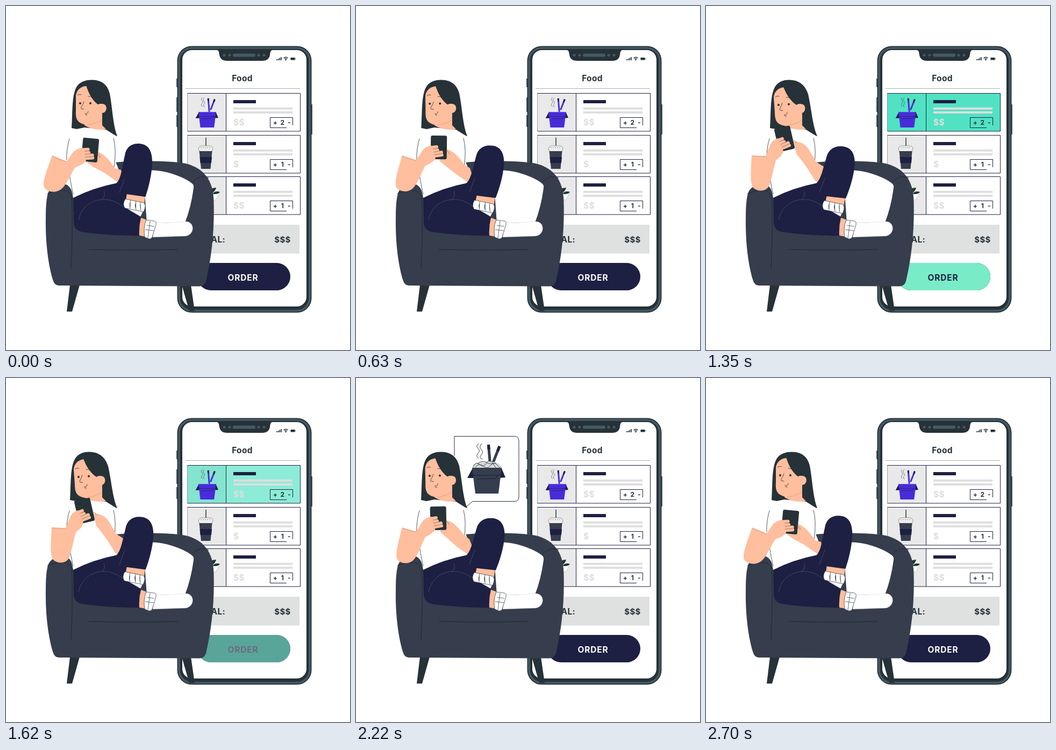
An HTML page for the animation above (2760 ms loop, 640x640 px).

```html
<!DOCTYPE html>
<html lang="en">
<head>
<meta charset="utf-8">
<title>Ordering food from the couch</title>
<style>
  html, body { margin: 0; width: 100%; height: 100%; overflow: hidden; background: #fff; }
  svg { display: block; width: 100vw; height: 100vh; }
  text { font: 700 15.5px Inter, "Open Sans", sans-serif; fill: #263238; letter-spacing: .3px; }
  .line { fill: none; stroke: #1d2040; stroke-width: 1; }
  .thin { fill: none; stroke: #263238; stroke-width: .8; stroke-linecap: round; }
  .skin { fill: #ffbe9d; }
  .navy { fill: #1d2042; }
  .sofa { fill: #363d4c; }
  .dark { fill: #263238; }
  .steel { fill: #455a64; }
  .white { fill: #fff; }
</style>
</head>
<body>
<svg viewBox="0 0 640 640">
  <defs>
    <g id="takeout">
      <path d="M218 166L207 186H220M270 166L278 185L266 186" fill="#1d2042"/>
      <path d="M216 167H271L265 215H222Z"/>
      <g fill="none" stroke-linecap="round">
        <path d="M228 122q-6 5-1 9t0 9t1 10M234 122q-6 6-1 11t0 10t2 8" stroke="#37404a"/>
        <path d="M217 181H269M226 188L260 187L265 178" stroke="#1a1d35" stroke-opacity=".65" stroke-width="1.5"/>
      </g>
    </g>
    <g id="sticks" fill="none" stroke-width="5">
      <path d="M246.500 124L250 166M267 127L254 160" stroke="currentColor"/>
      <path d="M246.500 124L247.200 133M267 127L263.500 136" stroke="#1d2042"/>
    </g>
  </defs>

  <g id="handset">
    <path class="steel" d="M317 135h4v16h-4zM317 170h4v27h-4zM317 203h4v22h-4zM566 183h4v56h-4z"/>
    <rect class="dark" x="318.500" y="74.500" width="250" height="496" rx="27"/>
    <rect x="322" y="78" width="243" height="489" rx="24" fill="none" stroke="#455a64" stroke-width="3.500"/>
    <rect class="white" x="328" y="82" width="231" height="477" rx="18"/>
    <path class="dark" d="M389 81C397 82 396 86 397 91Q399 102 411 102H477Q489 102 491 91C492 86 491 82 499 81Z"/>
    <rect class="steel" x="422" y="88.500" width="42" height="6" rx="3"/>
    <g class="steel">
      <circle cx="406" cy="91.500" r="2.500"/><circle cx="416" cy="91.500" r="2.500"/>
      <circle cx="470" cy="91.500" r="2.500"/><circle cx="480" cy="91.500" r="2.500"/>
    </g>
    <path class="dark" d="M503 99h1.700v2h-1.700zM505.700 98h1.700v3h-1.700zM508.400 96.500h1.700v4.500h-1.700zM511.100 95h1.700v6h-1.700zM529.500 96h8v4.500h-8zM538 97.500h1v1.500h-1z"/>
    <path d="M516.500 97q4-3.500 8 0M518.300 99q2.200-2 4.400 0" fill="none" stroke="#263238" stroke-width="1.300"/>
    <circle cx="520.500" cy="100.500" r="1"/>
    <text x="439.500" y="139.500" text-anchor="middle">Food</text>
    <path d="M334 153.500H547" stroke="#999" stroke-width=".8"/>
    <g id="cards"></g>

    <use href="#takeout" fill="#482cda" transform="translate(229.500 98) scale(.595)"/>
    <use href="#sticks" color="#482cda" transform="translate(229.500 98) scale(.595)"/>

    <path d="M372 245V263" stroke="#263238" stroke-width="1.500"/>
    <path d="M358 266Q358 261 364 260H379Q385 261 385 266L383 271H360Z" fill="#ededed" stroke="#777" stroke-width=".7"/>
    <path d="M362 263.500H382" stroke="#999" stroke-dasharray="2 2"/>
    <path class="sofa" d="M359.500 270H383.500L380.500 303H363Z"/>
    <path class="navy" d="M360.500 281H383L382 292H361.500Z"/>

    <path d="M370 349H397L390 361H370Z" fill="#fff" stroke="#aaa" stroke-width=".6"/>
    <path d="M376 349Q378 338 391 338Q389 346 381 349ZM384 349Q390 343 398 346Q395 350 388 350Z" fill="#1d3a2c"/>

    <rect x="337" y="407" width="209" height="53.500" fill="#dfe0e0"/>
    <text x="408" y="440" text-anchor="end">TOTAL:</text>
    <text x="514.500" y="440" text-anchor="middle" style="font-size:15px">$$$</text>
    <rect class="navy" x="356" y="478" width="173" height="51" rx="25.500"/>
    <text x="441" y="511" text-anchor="middle" style="fill:#fff;letter-spacing:.8px">ORDER</text>
    <g id="pressed">
      <rect x="356" y="478" width="173" height="51" rx="25.500" fill="#7aebc7"/>
      <text x="441" y="511" text-anchor="middle" style="fill:#1d2042;letter-spacing:.8px">ORDER</text>
    </g>
  </g>

  <g id="bubble">
    <path d="M183 145V108.500H295Q303 108.500 303 117V221Q303 229.500 295 229.500H217L196 247L200 229" fill="#fff" stroke="#263238"/>
    <use href="#sticks" color="#363d4f"/>
    <ellipse cx="243" cy="164" rx="26" ry="9" fill="#d9dadb"/>
    <path class="thin" d="M218 165q5-11 12-4t13-3t13 3t13 4M222 166q8-9 15-2t14-2t15 4M226 160q8-8 16-3t18 1"/>
    <use href="#takeout" fill="#363d4f"/>
  </g>

  <g id="couch">
    <path class="dark" d="M119 519H137L123 568.500H113ZM327 519H344L351 567.500H341Z"/>
    <path class="sofa" d="M203 291C240 287 300 288 325 291.500C368 297 387 326 386.500 365C388 420 382 470 372 512Q369 521.500 360 521.500L98 520Q90 520 87 509C79 483 73 440 74 395C74 374 75 356 79 346C84 335 98 330 108 331Q119 333 124 348L145 420L205 330Z"/>
    <path class="white" d="M255 306Q278 304 300 309.500Q331 318 346 330Q350 333 349 339Q344 375 333 403L262 404Z"/>
    <path d="M77 349Q115 335 122 354Q125 400 121 488M154 453Q240 455 320 453M347 328Q360 312 377 320" fill="none" stroke="#20252f" stroke-width=".9"/>
  </g>

  <g id="woman">
    <path class="dark" data-by="arm" d="M122 227C124 200 122 167 131 151C138 139 152 137 161 137.500C179 138 189 147 193 163C198 190 199 222 207 242L160 235Z"
      data-to="M119 227C121 200 119 167 128 151C135 139 147 137 156 137.500C174 138 185 148 190 164C196 190 198 222 207 242L160 235Z"/>
    <path class="white" d="M117 232L146 226L186 230L207 243L204 290L216 320L206 333L126 361L113 300L86 278Z"/>
    <path class="thin" d="M118 247Q112 268 113 286M200 246Q206 268 201 300M117 303Q119 325 125 350"/>
    <path class="skin" d="M150 205L179 196V222L186 229Q165 233 146 222Z"/>

    <g id="face">
      <path class="skin" d="M130 166C132 154 142 148 152 149C155 164 162 176 171 183Q175 181 179 182C190 182 189 199 179 199V212Q166 221 148 221C132 217 129 210 130 194Z"/>
      <path class="thin" d="M145 178C142 187 138 189 140 191L145 192M147 200Q152 202 153 196M148 202L151 203M133 166Q136 163 140 165M153 168Q158 167 162 171"/>
      <path d="M152 221Q168 219 179 212" fill="none" stroke="#e5967a" stroke-width=".8"/>
      <circle class="dark" cx="138" cy="181" r="2"/><circle class="dark" cx="157" cy="181" r="2"/>
      <path class="dark" d="M149 147L160 144L176 150L186 184Q178 179 171 183Q156 172 149 147Z"/>
    </g>

    <path class="skin" data-by="arm" d="M168 271C180 272 193 287 203 302L214 305L220 334L204 325L181 309C168 303 156 296 151 291Z"
      data-to="M163 252C176 252 187 258 193 270L205 290L219 299L215 334L203 325L187 298C179 288 168 275 160 269Z"/>

    <path class="skin" data-by="leg" d="M225 349L259 353L257 369L222 366Z" data-to="M225 352L259 356L256 372L221 369Z"/>
    <path class="white" data-by="leg" d="M222 374L256 380L249 394Z" data-to="M220 377L254 383L249 394Z"/>
    <path class="navy" d="M125 357Q162 338 208 329L224 350L221 375L254 394Q245 410 249 427.500C205 427 155 424 137 419Q125 414 126 400Z"/>
    <path class="navy" data-by="leg" d="M204 331C214 323 215 305 221 278C223 264 232 256 246 256C263 256 272 267 272 290C271.500 315 265 338 259.500 355L224 350L200 375Z"
      data-to="M204 331C214 323 217 305 224 282C227 269 236 261 250 261C267 261 277 270 277 293C275 318 267 342 260 358L224 354L200 375Z"/>
    <path d="M135 398C143 358 188 351 213 370L254 394M182 344Q186 354 178 361M211 347L221 320" fill="none" stroke="#50577a" stroke-width=".7"/>
    <path class="white" stroke="#263238" stroke-width=".7" data-by="leg" d="M222 359L256 366Q262 370 256 383L221 376Q216 368 222 359ZM232 361Q229 369 231 377M242 363Q239 371 242 379M250 365Q249 372 251 381"
      data-to="M220 362L254 369Q260 373 254 386L219 379Q214 371 220 362ZM230 364Q227 372 229 380M240 366Q237 374 240 382M248 368Q247 375 249 384"/>
    <path class="skin" d="M251 394L262 398L259 429L248 427Q247 410 251 394Z"/>
    <path class="white" stroke="#ccc" stroke-width=".5" d="M276 402C300 405 312 402 335 401C352 402 351 426 334 428L273 430Z"/>
    <path class="white" stroke="#263238" stroke-width=".7" d="M261 398L276 400Q280 401 279 407L272 430Q270 434 265 433L258 430Q255 412 261 398ZM262 408L276 410M259 416L275 418M268 400L264 432"/>

    <g id="device">
      <rect class="dark" x="-15" y="-22" width="30" height="44" rx="3"/>
    </g>
    <path class="skin" data-by="arm" d="M86 278L113 289L124 273C128 268 136 264 143 264L149 288C143 296 135 297 128 301C118 318 110 337 101 342C90 349 77 345 72 339C66 332 74 311 86 278Z"
      data-to="M85 278L111 279L119 260C121 253 127 248 134 246L144 270C142 278 136 282 130 287C125 305 122 322 118 333C114 344 100 346 92 341C81 337 83 316 85 278Z"/>
    <path class="thin" data-by="arm" d="M87 280Q99 286 113 290" data-to="M86 279Q98 280 111 280" style="stroke-opacity:.25"/>
    <g id="fingers" fill="none" stroke-linecap="round">
      <path d="M-17 1L-4 -1M-17 7L-2 5M-16 12L5 9M-14 17L6 14" stroke="#ffbe9d" stroke-width="6"/>
      <path d="M-10 3L-3 2M-9 9L4 6M-8 14L6 11.500M13 6Q18 6 20 12" stroke="#8c5a4b" stroke-width=".7"/>
    </g>
  </g>
</svg>
<script>
const LOOP = 2760;
const $ = id => document.getElementById(id);

const card = (y, price, count, i) => `
  <g transform="translate(0 ${y})">
    <rect x="337.500" width="72" height="71" fill="#e9e9ea"/>
    ${i ? '' : '<rect id="chosen" x="337.500" width="210" height="71" fill="#50e2c3"/>'}
    <path class="line" d="M337.500 .5H547.500V71H337.500M409.500 0V71"/>
    <path class="line" d="M337.500 0V71" stroke-opacity=".4"/>
    <rect class="navy" x="423" y="13" width="42" height="6"/>
    <path d="M423 28.700H533M423 36H533" stroke="#dedede" stroke-width="4"/>
    <text x="423" y="59.500" style="fill:#dedede">${price}</text>
    <path class="line" d="M522 64.500H491.500V45.500H533.500V60"/>
    <g text-anchor="middle">${['+', count, '-'].map((s, k) =>
      `<text x="${[501, 514.5, 527][k]}" y="59" style="font-size:12px">${s}</text>`).join('')}</g>
  </g>`;
$('cards').innerHTML = card(162, '$$', 2, 0) + card(240, '$', 1, 1) + card(317, '$$', 1, 2);

const clamp = v => Math.max(0, Math.min(1, v));
const ease = (t, from, to) => (1 - Math.cos(Math.PI * clamp((t - from) / (to - from)))) / 2;
const mix = (a, b, p) => a + (b - a) * p;
const shown = (t, from, to) => clamp((t - from) / 90) * clamp((to - t) / 90);

const number = /-?[\d.]+/g;
const morphs = [...document.querySelectorAll('[data-to]')].map(el => ({
  el, by: el.dataset.by, start: el.getAttribute('d'), end: el.dataset.to.match(number).map(Number)
}));

function draw(now) {
  const t = now % LOOP;
  const pose = {
    arm: ease(t, 350, 1220) - ease(t, 1600, 2620),
    leg: (1 - Math.cos(t / LOOP * 6 * Math.PI)) / 2
  };
  for (const { el, by, start, end } of morphs) {
    let i = 0;
    el.setAttribute('d', start.replace(number, n => mix(+n, end[i++], pose[by]).toFixed(2)));
  }
  const p = pose.arm;
  const grip = `translate(${mix(156.5, 146, p)} ${mix(268, 247, p)}) rotate(${mix(5, -13, p)})`;
  $('device').setAttribute('transform', grip);
  $('fingers').setAttribute('transform', grip);
  $('face').setAttribute('transform', `rotate(${-4 * p} 180 225)`);
  $('chosen').style.opacity = shown(t, 660, 1680);
  $('pressed').style.opacity = shown(t, 1140, 1680);
  $('bubble').style.opacity = shown(t, 1650, 2580);
  requestAnimationFrame(draw);
}
draw(0);
</script>
</body>
</html>
```
